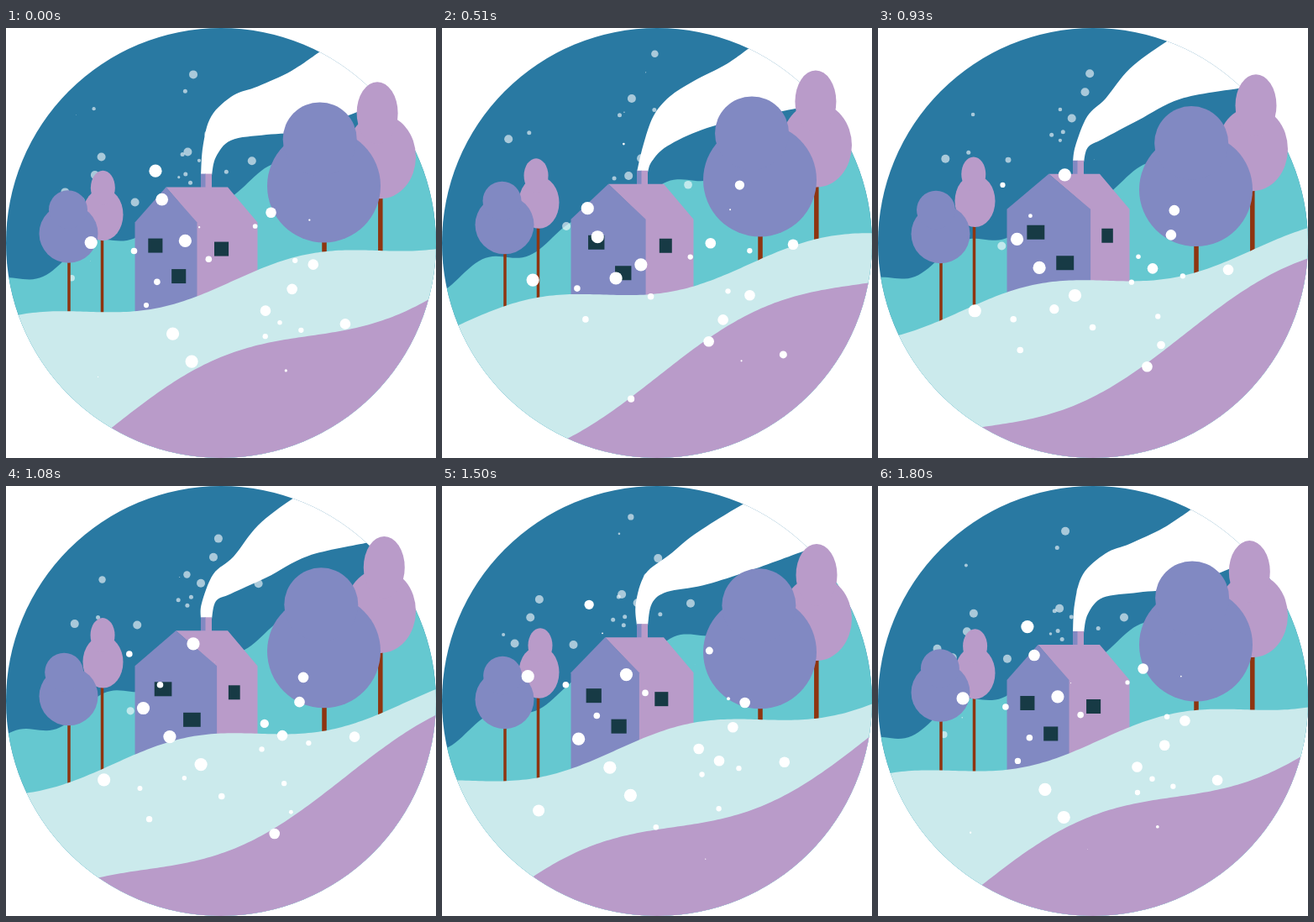
An HTML page with a canvas for the animation above (1830 ms loop, 512 by 512 pixels).

```html
<!DOCTYPE html>
<html lang="en">
<head>
<meta charset="utf-8">
<title>Winter house</title>
<style>
html, body { margin: 0; width: 100%; height: 100%; overflow: hidden; background: #fff; }
canvas { display: block; width: 100vw; height: 100vh; }
</style>
</head>
<body>
<canvas width="512" height="512"></canvas>
<script>
const ctx = document.querySelector('canvas').getContext('2d');
const LOOP = 1830, STEP = 30, FALL = 2610;
const SKY = '#2979a2', TEAL = '#65c8d0', SNOW = '#cbeaec', MAUVE = '#b99bc9',
      BLUE = '#8189c2', TRUNK = '#8e3510', GLASS = '#173a45';

let turn = 0; // degrees through the loop

// Swings around mean, reaching its maximum at the given phase
const osc = (mean, amp, phase, speed = 1) =>
  mean + amp * Math.cos((turn * speed - phase) * Math.PI / 180);

// Hills are sine waves travelling along a slope
const farHill = { color: TEAL, left: 305, slope: .42, amp: 9.5, phase: 218, pitch: 3.3, speed: 2 };
const snowHill = { color: SNOW, left: 358, slope: .21, amp: 13.3, phase: 170, pitch: 1.039, speed: 1 };
const frontHill = { color: MAUVE, left: 534.5, slope: .465, amp: 24, phase: -6, pitch: .765, speed: 1 };

// Smoke edges: x, y, swing in x, swing in y, phase
const smokeTop = [[235, 140, 4.5, 0, 95], [247, 105, 5, 0, 120], [271, 82, 0, 2, 200],
                  [300, 59, 0, 12, 30], [340, 35, 0, 19, 33], [376, 12, 0, 16, 25]];
const smokeLow = [[250, 148, 0, 13, 65], [268, 133, 0, 8, 85], [310, 118.5, 0, 9.5, 25],
                  [360, 103, 0, 20, 25], [430, 84, 0, 17, 47]];

// trunk: x, width; body: x, y, rx, ry; head: y, rx, ry; bob and nod: mean, swing, phase
const trees = [
  { color: MAUVE, trunk: [114.5, 3.5], body: [115.5, 222, 24, 31], head: [190, 14.5, 20.5],
    bob: [-8, 9.5, 330], nod: [114.5, 2.5, 290] },
  { color: BLUE, trunk: [75, 3.5], body: [74.5, 245, 35, 35], head: [216.5, 23, 23],
    bob: [-.3, 10.5, 270], nod: [71.5, 2.5, 10] },
  { color: MAUVE, trunk: [445.8, 5.5], body: [446, 153, 42, 50], head: [101, 24.5, 37],
    bob: [-4.5, 9.5, 300], nod: [446, 4.3, 205] },
  { color: BLUE, trunk: [379, 5.5], body: [378.5, 188.5, 67.5, 67.5], head: [133, 44, 44],
    bob: [1.5, 9.8, 258], nod: [373.3, 4.3, 275] }];

// Snow layers: large flakes as birth, x, y; small ones scattered over box (x, y, w, h)
const farSnow = { drop: 146, r: 5, sway: -5, alpha: .6, small: 6, box: [55, 40, 220, 100],
  large: [[1215, 228, 21], [460, 242, 50], [1800, 84, 102], [1080, 101, 133], [750, 219, 87],
          [660, 152, 142], [1340, 75, 168], [110, 297, 62], [175, 257, 12], [750, 111, 93]] };
const midSnow = { drop: 187, r: 6.3, sway: -7.5, alpha: 1, small: 3, box: [290, 180, 100, 60],
  large: [[1220, 323, 176], [10, 411, 222], [160, 360, 162], [450, 342, 212], [760, 313, 260]] };
const nearSnow = { drop: 228, r: 7.6, sway: 8, alpha: 1, small: 3, box: [135, 135, 125, 80],
  large: [[1210, 170, 116], [1080, 109, 190], [440, 215, 132], [1450, 192, 171], [1770, 229, 232]] };

let seed = 7;
const random = () => (seed = seed * 16807 % 2147483647) / 2147483647;

for (const layer of [farSnow, midSnow, nearSnow]) {
  const [x, y, w, h] = layer.box;
  layer.flakes = layer.large.map(f => [...f, layer.r]);
  for (let i = 0; i < layer.small; i++)
    layer.flakes.push([random() * LOOP, x + random() * w, y + random() * h, layer.r / 2]);
}

function snow({ flakes, drop, sway, alpha }, t) {
  ctx.globalAlpha = alpha;
  flakes.forEach(([birth, x, y, r], i) => {
    const side = i % 2 ? -sway : sway;
    for (let age = (t - birth + LOOP) % LOOP; age < FALL; age += LOOP) {
      const p = age / FALL;
      const size = r * Math.min(1, p / .15, (1 - p) / .15);
      ellipse(x + side * Math.sin(2 * Math.PI * p), y + drop * p, size, size, '#fff');
    }
  });
  ctx.globalAlpha = 1;
}

function ellipse(x, y, rx, ry, color) {
  ctx.fillStyle = color;
  ctx.beginPath();
  ctx.ellipse(x, y, rx, ry, 0, 0, 7);
  ctx.fill();
}

function rect(x, y, w, h, color) {
  ctx.fillStyle = color;
  ctx.fillRect(x, y, w, h);
}

function poly(color, ...points) {
  ctx.fillStyle = color;
  ctx.beginPath();
  points.forEach(p => ctx.lineTo(...p));
  ctx.fill();
}

// Adds a smooth line through the points to the path
function curve(points) {
  const n = points.length - 1;
  ctx.lineTo(...points[0]);
  for (let i = 0; i < n; i++) {
    const [a, b, c, d] = [i - 1, i, i + 1, i + 2].map(k => points[Math.max(0, Math.min(n, k))]);
    ctx.bezierCurveTo(b[0] + (c[0] - a[0]) / 6, b[1] + (c[1] - a[1]) / 6,
                      c[0] - (d[0] - b[0]) / 6, c[1] - (d[1] - b[1]) / 6, c[0], c[1]);
  }
}

function hill({ color, left, slope, amp, phase, pitch, speed }) {
  const line = [];
  for (let x = 0; x <= 512; x += 4)
    line.push([x, osc(left - slope * x, amp, phase + pitch * x, speed)]);
  poly(color, ...line, [512, 540], [0, 540]);
}

function insideDisc(paint) {
  ctx.save();
  ctx.beginPath();
  ctx.arc(256, 256, 256, 0, 7);
  ctx.clip();
  paint();
  ctx.restore();
}

function smoke(ridge) {
  const move = ([x, y, dx, dy, phase]) => [osc(x, dx, phase), osc(y, dy, phase)];
  const vent = ridge - 14;
  ctx.fillStyle = '#fff';
  ctx.beginPath();
  curve([[232, vent], ...smokeTop.map(move)]);
  ctx.lineTo(430, -30);
  ctx.lineTo(520, -30);
  ctx.lineTo(520, 40);
  curve([[245, vent], ...smokeLow.map(move)].reverse());
  ctx.fill();
}

function tree({ color, trunk, body, head, bob, nod }) {
  const dy = osc(...bob);
  const [x, y, rx, ry] = body;
  rect(trunk[0] - trunk[1] / 2, y + dy, trunk[1], ry + 100, TRUNK);
  ellipse(x, y + dy, rx, ry, color);
  ellipse(osc(...nod), head[0] + dy, head[1], head[2], color);
}

// The front corner slides sideways, so the house seems to turn
function house(ridge) {
  const left = 153.5, right = 299.5, eave = ridge + 42, base = 345;
  const corner = osc(240.3, 12.8, 180);
  const front = corner - left, side = right - corner, peak = (left + corner) / 2;
  rect(232, ridge - 16, 6, 17, BLUE);
  rect(237.5, ridge - 16, 7.5, 17, MAUVE);
  poly(MAUVE, [peak, ridge], [264, ridge], [right, eave], [right, base], [corner - 1, base], [corner - 1, eave]);
  poly(BLUE, [left, base], [left, eave], [peak, ridge], [corner, eave], [corner, base]);
  const pane = front * .15 + 6;
  rect(left + front * .315 - 7.5, ridge + 61, pane, 17, GLASS);
  rect(left + front * .59, ridge + 97.5, pane, 17, GLASS);
  rect(corner + side * .285, ridge + 65, side * .14 + 7, 17, GLASS);
}

function draw(now) {
  const t = Math.floor(now % LOOP / STEP) * STEP;
  turn = t / LOOP * 360;
  const ridge = osc(181.8, 9.5, 35);
  ctx.clearRect(0, 0, 512, 512);
  ellipse(256, 256, 256, 256, SKY);
  insideDisc(() => {
    smoke(ridge);
    hill(farHill);
    snow(farSnow, t);
  });
  trees.forEach(tree);
  house(ridge);
  insideDisc(() => {
    hill(snowHill);
    hill(frontHill);
  });
  snow(midSnow, t);
  snow(nearSnow, t);
}

let start;
function tick(now) {
  start ??= now;
  draw(now - start);
  requestAnimationFrame(tick);
}
draw(0);
requestAnimationFrame(tick);
</script>
</body>
</html>
```
